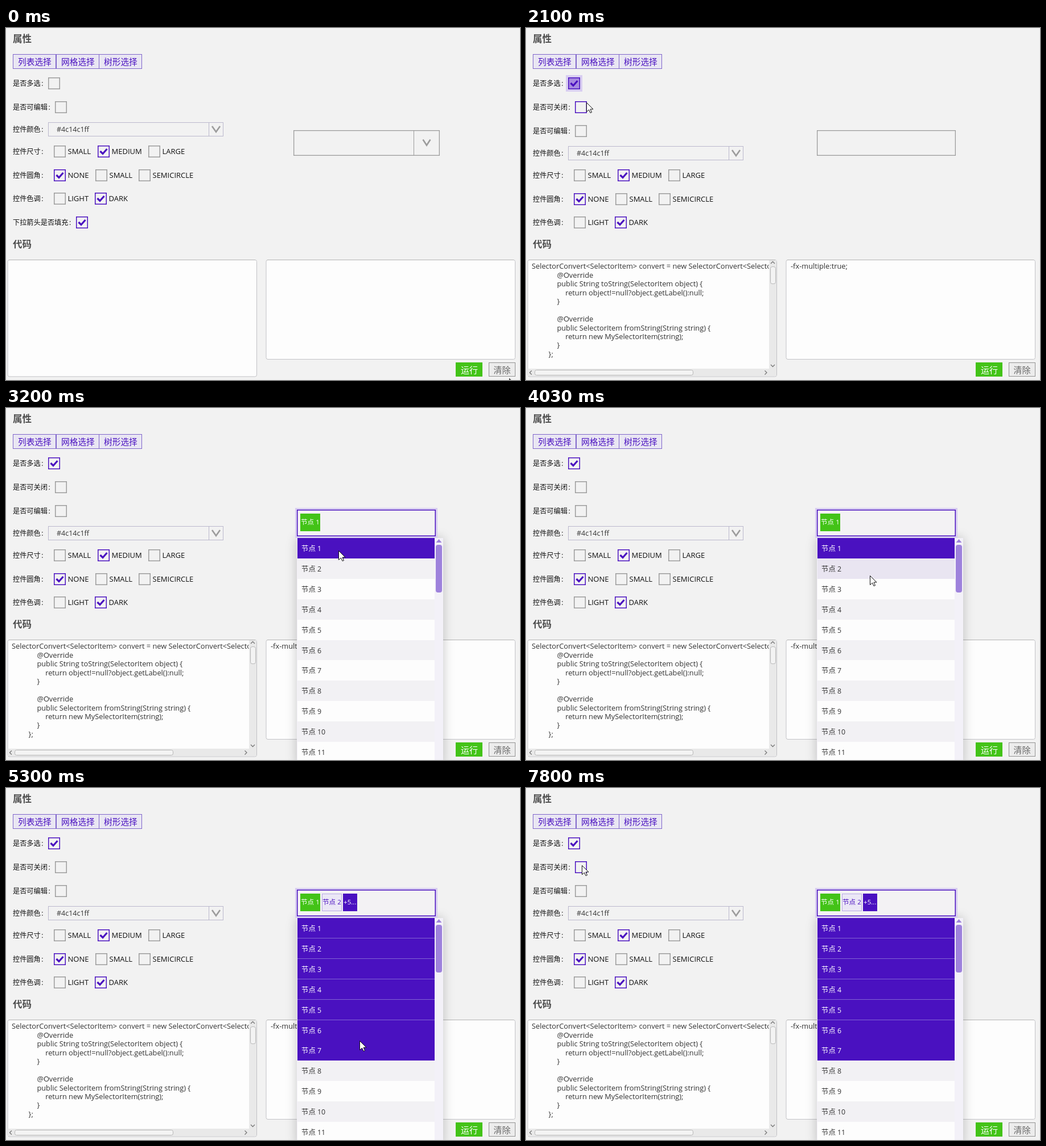
Write an HTML page with a canvas that moves like this. It is 903 px wide and 620 px high and loops after 8 s.

```html
<!DOCTYPE html>
<html lang="zh-CN">
<head>
<meta charset="utf-8">
<style>
html, body { margin: 0; width: 100%; height: 100%; overflow: hidden; background: #f2f2f2; }
canvas { display: block; }
</style>
</head>
<body>
<canvas id="stage" width="903" height="620"></canvas>
<script>
const ctx = document.getElementById('stage').getContext('2d');
const LOOP = 8000;
const PURPLE = '#4a11c0', GREEN = '#43c317', GREY = '#9c9c9c', INK = '#333';
const FONT = '"Open Sans", "Noto Sans CJK SC", "Noto Sans CJK", sans-serif';

// Moments at which the interface changes
const LIST_CLICK = 1530, MULTI_CLICK = 1850, OPEN = 2800;
const PICK_FIRST = 3200, PICK_SECOND = 4270, PICK_RANGE = 5100;

// Pointer path: time, x, y
const PATH = [
  [0, 884, 617], [30, 880, 608], [300, 640, 470], [600, 270, 285], [830, 112, 203],
  [900, 92, 130], [1000, 74, 60], [1500, 74, 60], [1780, 83, 96], [1900, 84, 98],
  [2100, 106, 131], [2300, 108, 136], [2330, 112, 138], [2700, 600, 205], [2850, 610, 207],
  [3100, 584, 251], [3200, 584, 251], [3700, 592, 291], [3970, 592, 291], [4030, 604, 295],
  [4300, 604, 295], [4630, 607, 355], [5030, 622, 462], [5100, 622, 462], [5130, 622, 446],
  [5300, 622, 446], [5600, 255, 246], [5730, 274, 254], [5970, 274, 254], [6300, 32, 122],
  [6530, 95, 138], [6800, 95, 138], [7050, 520, 225], [7250, 640, 298], [7420, 747, 230],
  [7600, 733, 150], [7800, 98, 136], [8000, 98, 136]
];

const CODE = [
  [0, 'SelectorConvert<SelectorItem> convert = new SelectorConvert<SelectorItem>() {'],
  [12, '@Override'],
  [12, 'public String toString(SelectorItem object) {'],
  [16, 'return object!=null?object.getLabel():null;'],
  [12, '}'],
  [0, ''],
  [12, '@Override'],
  [12, 'public SelectorItem fromString(String string) {'],
  [16, 'return new MySelectorItem(string);'],
  [12, '}'],
  [8, '};'],
  [0, ''],
  [8, 'selector.setItems(FXCollections.observableArrayList(items));']
];

let mouse = { x: 0, y: 0 };

function pointerAt(t) {
  const i = Math.max(1, PATH.findIndex(p => p[0] > t));
  const [t0, x0, y0] = PATH[i - 1], [t1, x1, y1] = PATH[i];
  const k = (t - t0) / (t1 - t0);
  return { x: x0 + (x1 - x0) * k, y: y0 + (y1 - y0) * k };
}

const hovered = (x, y, w, h) =>
  mouse.x >= x && mouse.x < x + w && mouse.y >= y && mouse.y < y + h;

function text(str, x, cy, size, color = '#111', weight = 400) {
  ctx.font = `${weight} ${size}px ${FONT}`;
  ctx.fillStyle = color;
  ctx.fillText(str, x, cy + size * 0.37);
}

function rect(x, y, w, h, fill, stroke, lineWidth = 1) {
  if (fill) {
    ctx.fillStyle = fill;
    ctx.fillRect(x, y, w, h);
  }
  if (stroke) {
    ctx.strokeStyle = stroke;
    ctx.lineWidth = lineWidth;
    ctx.strokeRect(x + lineWidth / 2, y + lineWidth / 2, w - lineWidth, h - lineWidth);
  }
}

function round(x, y, w, h, r, fill, stroke) {
  ctx.beginPath();
  ctx.roundRect(x, y, w, h, r);
  if (fill) { ctx.fillStyle = fill; ctx.fill(); }
  if (stroke) { ctx.strokeStyle = stroke; ctx.lineWidth = 1; ctx.stroke(); }
}

function line(points, color, width) {
  ctx.beginPath();
  points.forEach(([x, y]) => ctx.lineTo(x, y));
  ctx.strokeStyle = color;
  ctx.lineWidth = width;
  ctx.stroke();
}

const chevron = (x, y, w, h) =>
  line([[x - w, y - h], [x, y + h], [x + w, y - h]], GREY, 2.6);

function label(str, cy) {
  text(str, 12, cy, 12.2);
  text(':', 13.5 + str.length * 12.2, cy, 12.2);
}

function checkbox(x, cy, on, focused) {
  const y = cy - 10;
  if (focused) rect(x - 4, y - 4, 29, 29, '#d8cdf1');
  const active = on || hovered(x, y, 21, 21);
  rect(x, y, 21, 21, focused ? '#a88be0' : null, active ? PURPLE : GREY, 1.5);
  if (on) line([[x + 4.5, cy], [x + 9, cy + 4.5], [x + 16.5, cy - 4]], PURPLE, 3.2);
}

function options(title, cy, items, chosen) {
  label(title, cy);
  items.forEach(([x, name], i) => {
    checkbox(x, cy, i === chosen);
    text(name, x + 24.5, cy, 13);
  });
}

function properties(t) {
  const multi = t >= MULTI_CLICK;
  const shift = multi ? 42 : 0;
  text('属性', 12, 19, 16.5, '#4d4d4d', 700);
  ['列表选择', '网格选择', '树形选择'].forEach((name, i) => {
    const x = 12 + Math.round(i * 75.5);
    rect(x, 46, 76, 26, hovered(x, 46, 76, 26) ? '#dcd5ec' : '#e9e6f3', '#8066cb');
    text(name, x + 9, 59.5, 14.7, PURPLE);
  });

  label('是否多选', 97);
  checkbox(74, 97, multi, multi && t < OPEN);
  if (multi) {
    label('是否可关闭', 139);
    checkbox(86, 139, false);
  }
  label('是否可编辑', 139 + shift);
  checkbox(86, 139 + shift, false);

  const cy = 178 + shift;
  label('控件颜色', cy);
  rect(74, cy - 12, 308, 25, null, '#bbb8cd');
  rect(356, cy - 12, 1, 25, '#bbb8cd');
  text('#4c14c1ff', 89, cy, 12.5, INK);
  chevron(369, cy, 7, 5);

  options('控件尺寸', 217 + shift, [[84, 'SMALL'], [161, 'MEDIUM'], [250, 'LARGE']], 1);
  options('控件圆角', 259 + shift, [[84, 'NONE'], [157, 'SMALL'], [233, 'SEMICIRCLE']], 0);
  options('控件色调', 300 + shift, [[84, 'LIGHT'], [156, 'DARK']], 1);
  if (!multi) {
    label('下拉箭头是否填充', 342);
    checkbox(123, 342, true);
  }
}

function scrollbars() {
  rect(427, 409, 13, 191, '#e9e9e9');
  rect(3, 600, 437, 13, '#e9e9e9');
  round(429.5, 420.5, 9, 30, 3, '#f3f3f3', '#b5b5b5');
  round(15.5, 602.5, 278, 9, 3, '#f3f3f3', '#b5b5b5');
  const arrow = (...points) => line(points, '#777', 1.3);
  arrow([430, 415], [433.5, 411.5], [437, 415]);
  arrow([430, 593], [433.5, 596.5], [437, 593]);
  arrow([10, 603.5], [6.5, 607], [10, 610.5]);
  arrow([419.5, 603.5], [423, 607], [419.5, 610.5]);
}

function codePanels(t) {
  text('代码', 12, 380.5, 16.5, '#4d4d4d', 700);
  round(3, 408.5, 437.5, 205.5, 3, '#fdfdfd', '#c2c2c6');
  round(457, 408.5, 437.5, 175, 3, '#fdfdfd', '#c2c2c6');
  rect(5, 408, 433, 1, '#b3b3b3');
  rect(459, 408, 433, 1, '#b3b3b3');
  if (t >= LIST_CLICK) {
    ctx.save();
    ctx.beginPath();
    ctx.rect(4, 409, 422.5, 191);
    ctx.clip();
    CODE.forEach(([indent, str], i) =>
      text(str, 10 + indent * 3.7, 419.5 + i * 15.47, 12.8, INK));
    ctx.restore();
    scrollbars();
  }
  if (t >= MULTI_CLICK) text('-fx-multiple:true;', 465, 419.5, 12.8, INK);
  rect(790, 589, 47, 25, GREEN);
  text('运行', 799, 602, 15, '#fff');
  rect(848, 589, 47, 25, '#ececec', '#929292');
  text('清除', 856.5, 602, 15, '#666');
}

function tag(str, x, w, fill, color, border) {
  rect(x, 186, w, 31, fill, border);
  text(str, x + 1, 201, 11.6, color);
}

function popup(count) {
  ctx.save();
  ctx.shadowColor = 'rgba(0,0,0,.22)';
  ctx.shadowBlur = 18;
  rect(511, 229, 257, 400, '#f3f1f8');
  ctx.restore();
  for (let i = 0; i < 11; i++) {
    const y = Math.round(229 + i * 35.9);
    const selected = i < count;
    const fill = selected ? PURPLE
      : hovered(512, y, 241, 36) ? '#e9e5f1'
      : i % 2 ? '#f2f1f4' : '#fdfdfd';
    rect(512, y, 241, 36, fill);
    if (selected && i < count - 1) rect(512, y + 35, 241, 1, '#8264d4');
    text(`节点 ${i + 1}`, 519, y + 18, 12.4, selected ? '#fff' : INK);
  }
  round(755, 241, 11, 84, 4, '#9e82dc');
  ctx.beginPath();
  ctx.moveTo(755.5, 237);
  ctx.lineTo(760.5, 231);
  ctx.lineTo(765.5, 237);
  ctx.fill();
}

function selector(t) {
  if (t < MULTI_CLICK) {
    rect(505, 180, 257, 45, null, GREY, 1.3);
    rect(716, 180, 1, 45, GREY);
    chevron(739, 201.5, 6.5, 5);
    return;
  }
  if (t < OPEN) {
    rect(511, 180, 244, 45, null, GREY, 1.3);
    return;
  }
  const count = t < PICK_FIRST ? 0 : t < PICK_SECOND ? 1 : t < PICK_RANGE ? 2 : 7;
  popup(count);
  rect(508, 176, 250, 53, '#d8cdf1');
  rect(511, 179, 244, 47, '#f3f2f4', PURPLE, 1.5);
  if (count > 0) tag('节点 1', 517, 35, GREEN, '#fff');
  if (count > 1) tag('节点 2', 555, 35, '#ebe7f6', PURPLE, '#b8a8e4');
  if (count > 2) tag(`+${count - 2}...`, 592, 25, PURPLE, '#fff');
}

function pointer() {
  ctx.save();
  ctx.translate(Math.round(mouse.x) + 0.5, Math.round(mouse.y) + 0.5);
  ctx.beginPath();
  [[0, 0], [0, 16], [4, 12.5], [6.5, 18], [9, 17], [6.5, 11.5], [11.5, 11.5]]
    .forEach(([x, y]) => ctx.lineTo(x, y));
  ctx.closePath();
  ctx.fillStyle = '#fff';
  ctx.strokeStyle = '#111';
  ctx.lineWidth = 1;
  ctx.fill();
  ctx.stroke();
  ctx.restore();
}

function draw() {
  const t = performance.now() % LOOP;
  mouse = pointerAt(t);
  rect(0, 0, 903, 620, '#f2f2f2');
  properties(t);
  codePanels(t);
  selector(t);
  pointer();
  requestAnimationFrame(draw);
}
draw();
</script>
</body>
</html>
```
